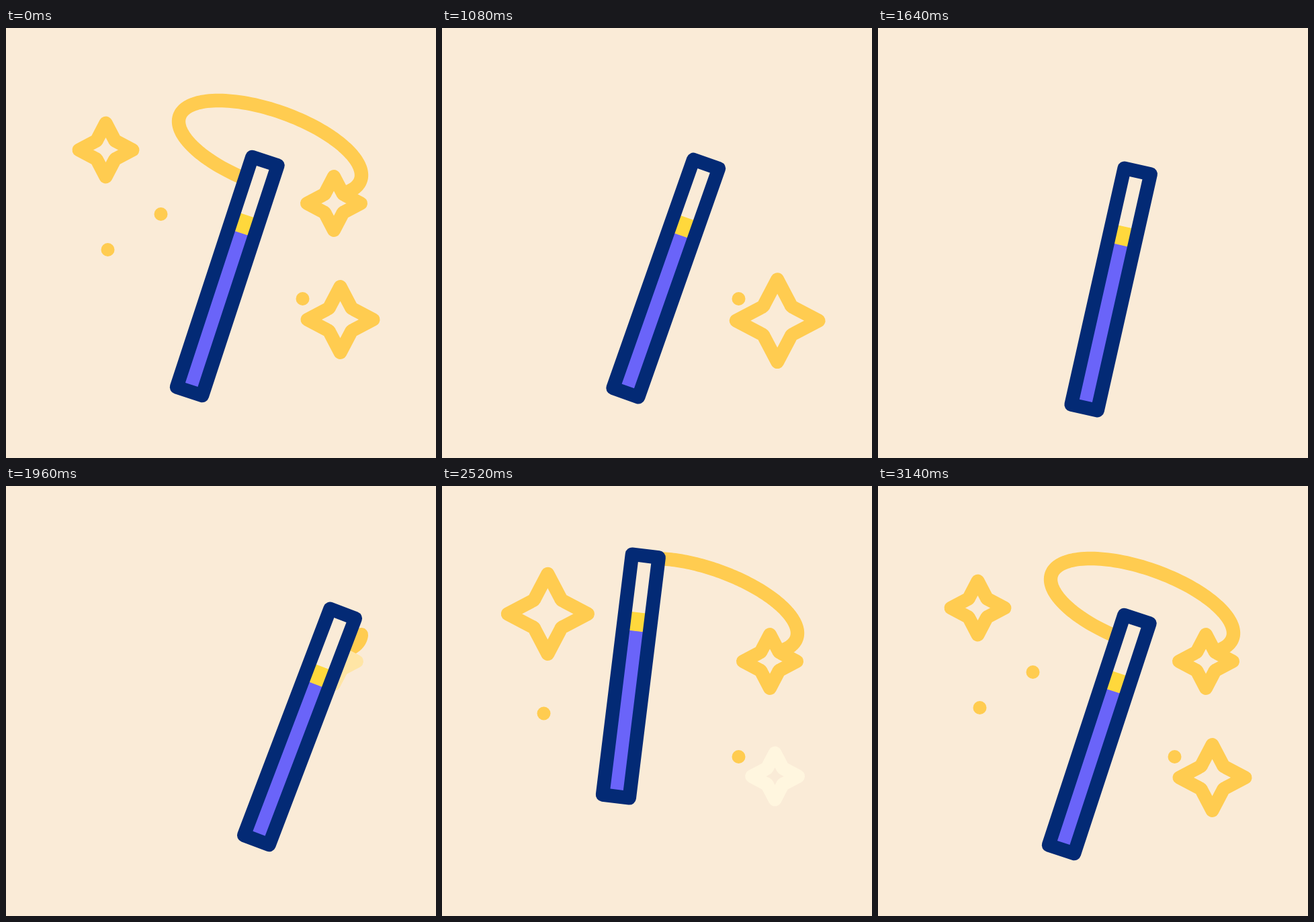
Write an HTML page with a canvas that moves like this. It is 640 px wide and 640 px high and loops after 3.6 s.

```html
<!DOCTYPE html>
<html lang="en">
<head>
<meta charset="utf-8">
<title>Magic wand</title>
<style>
  html, body { margin: 0; width: 100%; height: 100%; overflow: hidden; background: #faebd7; }
  canvas { display: block; }
</style>
</head>
<body>
<canvas id="stage" width="640" height="640"></canvas>
<script>
const ctx = document.getElementById('stage').getContext('2d');
const LOOP = 3600, POP = 480, RAD = Math.PI / 180;
const BG = '#faebd7', NAVY = '#032a75', GOLD = [255, 204, 80];

// Poses the wand glides through: wind-up, dip, swing round the ring, rest.
const rest = { x: 329.2, y: 369.5, angle: 18.17 };
const poses = [
  { t: 960, ...rest },
  { t: 1320, x: 347, y: 384, angle: 21.96 },
  { t: 1640, x: 346.5, y: 389, angle: 12.67 },
  { t: 2040, x: 447, y: 347, angle: 22 },
  { t: 2260, x: 365.4, y: 293.5, angle: 15.24 },
  { t: 2480, x: 288, y: 281, angle: 8 },
  { t: 2780, x: 267, y: 312, angle: 3.38 },
  { t: 3140, ...rest }
];

// out and back: when a part starts to leave and to return.
const stars = [
  { x: 488, y: 261, r: 40, drift: 0, over: .12, out: 220, back: 1830 },
  { x: 148.5, y: 181.5, r: 40, drift: 18, over: .66, out: 386, back: 2200 },
  { x: 497.5, y: 434, r: 49, drift: 6.5, over: .28, out: 810, back: 2432 }
];
const dots = [
  { x: 230.5, y: 277, out: 320, back: 2850 },
  { x: 151.5, y: 330, out: 641, back: 2440 },
  { x: 441.5, y: 403, out: 1065, back: 1980 }
];

const clamp = v => Math.max(0, Math.min(1, v));
const progress = (t, from, to) => clamp((t - from) / (to - from));
const smooth = u => (1 - Math.cos(Math.PI * u)) / 2;

// Grow from 0 past full size, then settle at 1.
function pop(u, over) {
  return u < .5
    ? (1 + over) * Math.sin(Math.PI * u)
    : 1 + over * (1 - smooth(2 * u - 1));
}

// Smooth curve through one property of the poses.
function glide(prop, t) {
  const last = poses.length - 1;
  if (t <= poses[0].t || t >= poses[last].t) return rest[prop];
  const i = poses.findIndex(p => p.t > t) - 1;
  const slope = j => j % last === 0 ? 0
    : (poses[j + 1][prop] - poses[j - 1][prop]) / (poses[j + 1].t - poses[j - 1].t);
  const a = poses[i], b = poses[i + 1], h = b.t - a.t;
  const u = (t - a.t) / h, v = 1 - u;
  return a[prop] * v * v * (1 + 2 * u) + b[prop] * u * u * (1 + 2 * v)
    + h * u * v * (slope(i) * v - slope(i + 1) * u);
}

// Fading parts turn towards white rather than transparent.
const gold = a => `rgb(${GOLD.map(v => Math.round(255 + (v - 255) * a))})`;

function setPen(color, width = 20) {
  ctx.strokeStyle = color;
  ctx.lineWidth = width;
  ctx.lineCap = ctx.lineJoin = 'round';
}

function drawRing(t) {
  const first = 33, sweep = 290, drawing = t >= 1840;
  const tail = drawing ? 0 : smooth(progress(t, 230, 720));
  const head = drawing ? 1 - (1 - progress(t, 1840, 3140)) ** 1.15 : 1;
  if (head - tail < .002) return;
  setPen(gold(1), 20.4);
  ctx.beginPath();
  for (let i = 0; i <= 120; i++) {
    const a = (first - sweep * (tail + (head - tail) * i / 120)) * RAD;
    ctx.lineTo(393 + 136 * Math.cos(a), 179 + 40 * Math.cos(a) + 58.7 * Math.sin(a));
  }
  ctx.stroke();
}

function drawStar({ x, y, r, drift, over, out, back }, t) {
  const u = t < back ? 1 - progress(t, out, out + POP) : progress(t, back, back + POP);
  const size = pop(u, over);
  if (size < .55) return;
  const shift = drift * (size - 1), k = r * size;
  ctx.save();
  ctx.translate(x + shift, y + shift);
  setPen(gold(clamp((size - .55) / .45) ** 1.6));
  ctx.beginPath();
  for (let i = 0; i < 4; i++) {
    const c = Math.cos(i * Math.PI / 2), s = Math.sin(i * Math.PI / 2);
    const at = (px, py) => [k * (px * c - py * s), k * (px * s + py * c)];
    ctx.lineTo(...at(1, 0));
    ctx.lineTo(...at(.41, .31));
    ctx.quadraticCurveTo(...at(.335, .335), ...at(.31, .41));
  }
  ctx.closePath();
  ctx.stroke();
  ctx.restore();
}

function drawDot({ x, y, out, back }, t) {
  const drop = t < back ? progress(t, out, out + 300) : 1 - progress(t, back, back + 260);
  if (drop >= 1) return;
  ctx.fillStyle = gold(clamp((1 - drop) / .14));
  ctx.beginPath();
  ctx.arc(x, y + 18 * drop * drop, 10, 0, 2 * Math.PI);
  ctx.fill();
}

function drawWand(t) {
  ctx.save();
  ctx.translate(glide('x', t), glide('y', t));
  ctx.rotate(glide('angle', t) * RAD);
  const band = (color, top, bottom) => {
    ctx.fillStyle = color;
    ctx.fillRect(-15, top, 30, bottom - top);
  };
  band(BG, -175, -95);
  band('#6a64f9', -68, 175);
  band('#ffd83c', -95.5, -67.5);
  setPen(NAVY, 20.5);
  ctx.strokeRect(-20, -180.25, 40, 360.5);
  ctx.restore();
}

function draw(t) {
  ctx.fillStyle = BG;
  ctx.fillRect(0, 0, 640, 640);
  drawRing(t);
  stars.forEach(s => drawStar(s, t));
  dots.forEach(d => drawDot(d, t));
  drawWand(t);
}

const start = performance.now();
function tick() {
  draw((performance.now() - start) % LOOP);
  requestAnimationFrame(tick);
}
tick();
</script>
</body>
</html>
```
